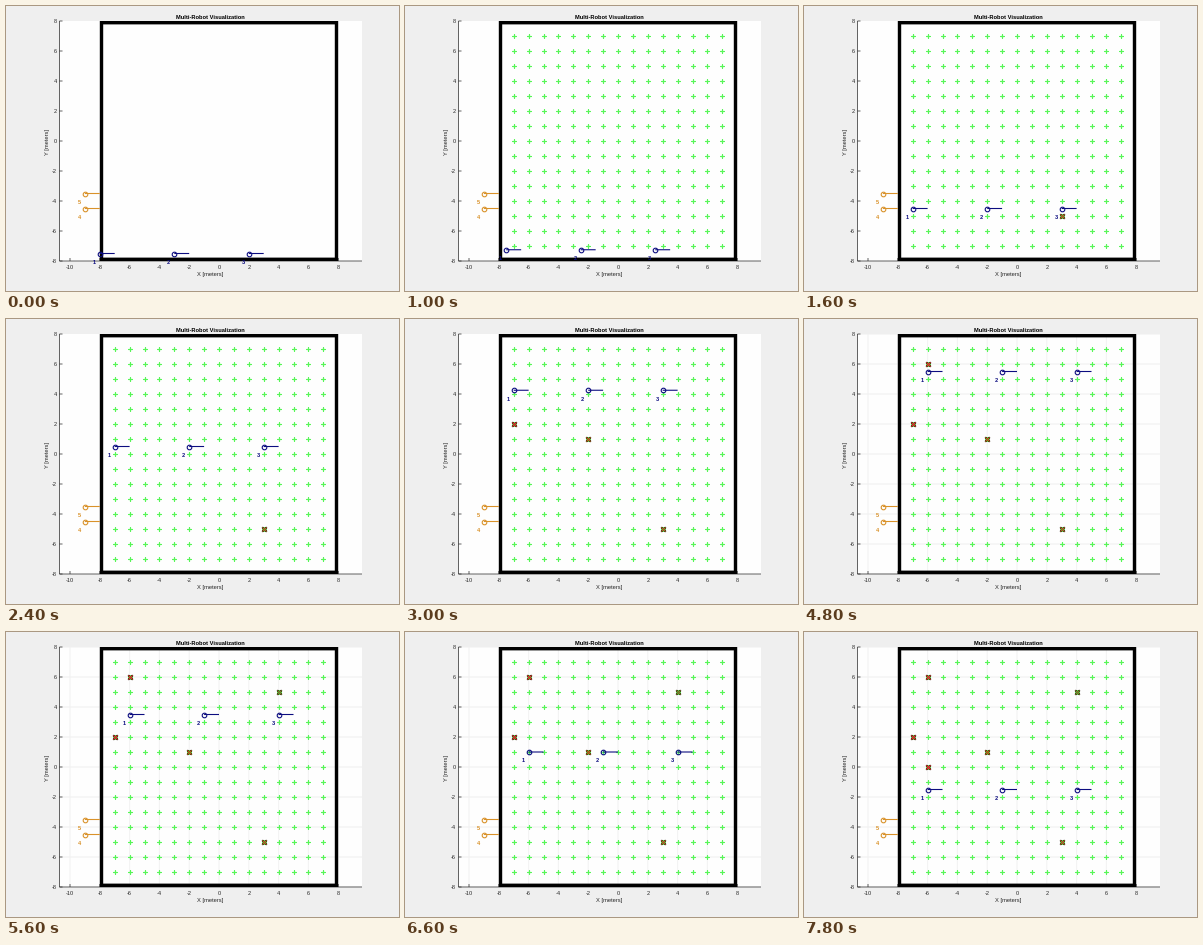
A matplotlib script for the animation above (8 s loop, 393 by 285 pixels).

```python
import numpy as np
import matplotlib.pyplot as plt
from matplotlib.animation import FuncAnimation
from matplotlib.patches import Rectangle

W, H, DPI = 393, 285, 100
STEP, FRAMES = 200, 40
PX = 72 / DPI
INK, NAVY, ORANGE, GREEN = "#262626", "#0c0c80", "#d9922a", "#58f658"
LEFT, RIGHT, TOP, BOTTOM = 53.5, 356, 15, 255
PLUS, CROSS = (4, 2, 0), (4, 2, 45)

plt.rcParams["font.family"] = "Liberation Sans"
plt.rcParams["path.snap"] = False
fig = plt.figure(figsize=(W / DPI, H / DPI), dpi=DPI, facecolor="#efefef")
ax = fig.add_axes([0, 0, 1, 1])
ax.set_xlim(0, W)
ax.set_ylim(H, 0)
ax.axis("off")


def sx(x):
    return 213 + 14.9 * x


def sy(y):
    return 135 - 15 * y


def line(xs, ys, color=INK, width=0.7, z=2):
    return ax.plot(xs, ys, color=color, lw=width * PX, zorder=z,
                   solid_capstyle="butt")[0]


def label(x, y, text, size=5.5, color=INK, **kw):
    opts = dict(ha="center", va="center_baseline", zorder=8)
    opts.update(kw)
    return ax.text(x, y, text, fontsize=size * PX, color=color, **opts)


def marks(x, y, marker, size, color, width, z):
    return ax.plot(x, y, marker=marker, ls="none", ms=size * PX, mec=color,
                   mfc="none", mew=width * PX, zorder=z)[0]


# Plot area, axes and ticks
ax.add_patch(Rectangle((LEFT, TOP), RIGHT - LEFT, BOTTOM - TOP,
                       fc="#fefefe", ec="none", zorder=0))
grid = []
for v in range(-10, 9, 2):
    x = sx(v)
    grid.append(line([x, x], [TOP, BOTTOM], "#f2f2f2", 1, 1))
    line([x, x], [BOTTOM - 3, BOTTOM])
    label(x, 261, str(v))
    if v >= -8:
        y = sy(v)
        grid.append(line([LEFT, RIGHT], [y, y], "#f0f0f0", 1, 1))
        line([LEFT, LEFT + 3], [y, y])
        label(51, y + 0.3, str(v), ha="right")
line([LEFT, LEFT], [TOP, BOTTOM])
line([LEFT, RIGHT], [BOTTOM, BOTTOM])
label(204.5, 11, "Multi-Robot Visualization", 5.8, "black", weight="bold")
label(204.5, 268, "X [meters]", 5.8)
label(41, 136, "Y [meters]", 5.8, rotation=90, va="center")

# Walls
ax.add_patch(Rectangle((95.5, 16.7), 235, 236.6, fill=False, ec="black",
                       lw=3.4 * PX, joinstyle="miter", zorder=3))

# Cells to visit
cells = np.arange(-7, 8)
gx, gy = np.meshgrid(sx(cells), sy(cells))
dots = marks(gx.ravel(), gy.ravel(), PLUS, 3.4, GREEN, 1.1, 4)

# Found items: x, y, color, time in ms
items = []
for x, y, color, start in [(3, -5, "#a8702c", 1600), (-2, 1, "#b06c20", 2600),
                           (-7, 2, "#d04030", 2800), (-6, 6, "#d04a30", 4600),
                           (4, 5, "#7c8a30", 5000), (-6, 0, "#dc3c30", 7200)]:
    parts = [marks(sx(x), sy(y), CROSS, 6.2, "#2c1c10", 1.7, 5),
             marks(sx(x), sy(y), CROSS, 5.4, color, 0.9, 5.1)]
    items.append((start, parts))


class Robot:
    def __init__(self, name, color):
        self.ray = line([0, 0], [0, 0], color, 1.1, 6)
        self.ring = marks(0, 0, "o", 4.6, color, 1.1, 7)
        self.name = label(0, 0, name, 5.6, color, weight="bold")

    def place(self, x, y):
        px, py = sx(x), sy(y)
        self.ray.set_data([px, px + 14.9], [py, py])
        self.ring.set_data([px], [py])
        self.name.set_position((px - 5.6, py + 8.5))


team = [Robot(str(i), NAVY) for i in (1, 2, 3)]
Robot("4", ORANGE).place(-9, -4.5)
Robot("5", ORANGE).place(-9, -3.5)

# Sweep path of the first robot; the others keep 5 m spacing
X_TIMES, X_STOPS = [800, 1200, 3600, 4200], [-8, -7, -7, -6]
Y_TIMES = [800, 1200, 1600, 2400, 3400, 3600, 4200, 4800, 6600, 7800]
Y_STOPS = [-7.5, -7, -4.5, 0.5, 6.75, 7, 7, 5.5, 1, -1.5]


def draw(i):
    t = i * STEP
    x = np.interp(t, X_TIMES, X_STOPS)
    y = np.interp(t, Y_TIMES, Y_STOPS)
    for k, robot in enumerate(team):
        robot.place(x + 5 * k, y)
    dots.set_visible(t >= 1000)
    for g in grid:
        g.set_visible(t >= 3800)
    for start, parts in items:
        for p in parts:
            p.set_visible(t >= start)
    return []


anim = FuncAnimation(fig, draw, frames=FRAMES, interval=STEP,
                     repeat=True, repeat_delay=0, blit=False)
plt.show()
```
